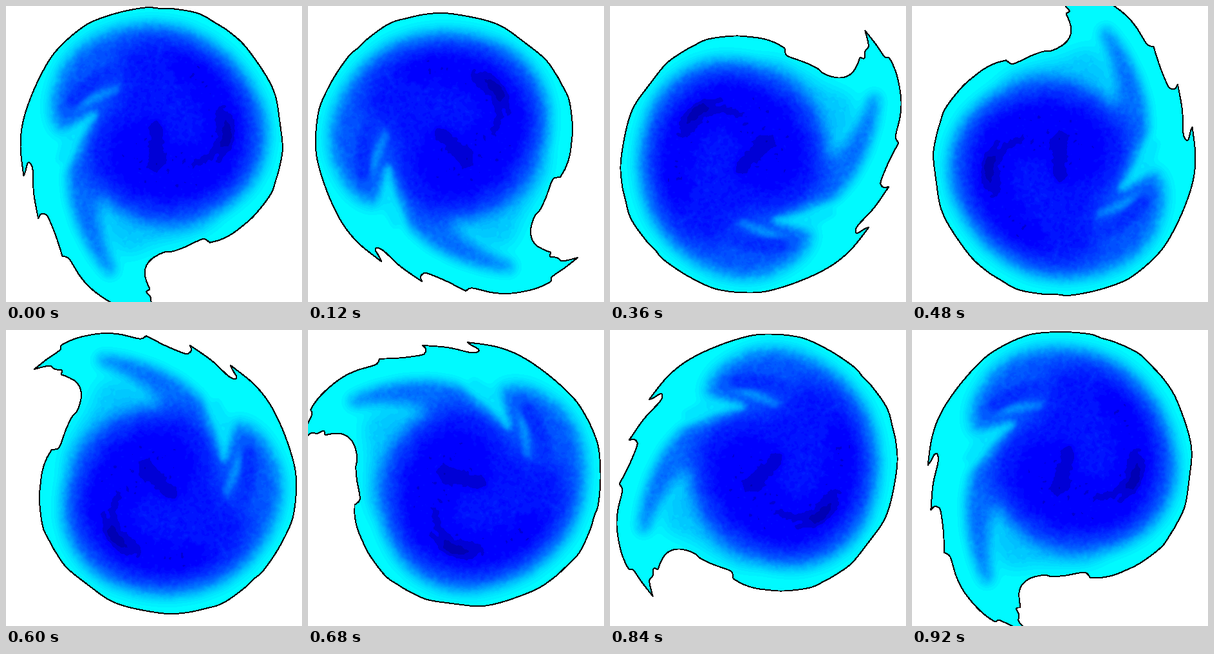
A matplotlib script for the animation above (960 ms loop, 460 by 460 pixels).

```python
import numpy as np
import matplotlib.pyplot as plt
from matplotlib.animation import FuncAnimation
from matplotlib.path import Path

SIZE = 460
DPI = 80
STEPS = 24
INTERVAL = 40
REST_STEP = 21            # step at which the shape stands as drawn below
CENTRE = np.array([231.0, 225.5])

# Rim of the swirl, cut into curves that meet at sharp points
TAIL_INNER = [(66, 413), (62, 398), (61, 388), (66, 381), (67, 371), (70, 370),
              (74, 371), (78, 361), (85, 349), (95, 342), (108, 340), (122, 343),
              (133, 348), (141, 355), (160, 364), (180, 371), (189, 376), (191, 386)]
BODY = [(191, 386), (205, 394), (222, 400), (240, 403), (270, 405), (310, 400),
        (332, 390), (350, 380), (375, 362), (400, 331), (422, 301), (433, 276),
        (441, 242), (446, 205), (444, 175), (439, 152), (430, 121), (408, 89),
        (392, 72), (380, 58), (347, 35), (310, 16), (285, 9), (250, 6),
        (215, 9), (165, 25), (120, 47), (88, 73), (60, 108)]
TOOTH_A = [(60, 108), (67, 105), (77, 99), (81, 101), (76, 112), (52, 138), (29, 171)]
TOOTH_B = [(29, 171), (36, 169), (41, 173), (41, 181), (29, 210), (14, 239)]
TAIL_OUTER = [(14, 239), (18, 245), (18, 253), (12, 278), (10, 300), (12, 322),
              (18, 348), (28, 370), (36, 373), (50, 393), (66, 413)]


def smooth(points, n=6):
    """Catmull-Rom curve through an open list of points."""
    p = np.array(points, float)
    p = np.vstack([p[:1], p, p[-1:]])
    t = (np.arange(n) / n)[:, None]
    parts = []
    for a, b, c, d in zip(p, p[1:], p[2:], p[3:]):
        parts.append(0.5 * (2 * b + (c - a) * t + (2 * a - 5 * b + 4 * c - d) * t**2
                            + (3 * b - a - 3 * c + d) * t**3))
    return np.vstack(parts)


RIM = np.vstack([smooth(s) for s in (TAIL_INNER, BODY, TOOTH_A, TOOTH_B, TAIL_OUTER)])
RIM = np.vstack([RIM, RIM[:1]])

yy, xx = np.mgrid[0:SIZE, 0:SIZE].astype(float)
pixels = np.column_stack([xx.ravel(), yy.ravel()])
freq = np.fft.fftfreq(SIZE)
freq2 = freq[:, None]**2 + freq[None, :]**2


def blur(a, sigma):
    return np.fft.ifft2(np.fft.fft2(a) * np.exp(-2 * np.pi**2 * sigma**2 * freq2)).real


def soft(field, level, sigma, points):
    """Blend a blurred polygon of the given level into the field."""
    mask = Path(points).contains_points(pixels).reshape(SIZE, SIZE).astype(float)
    mask = blur(mask, sigma)
    return field + (level - field) * mask


def make_field():
    """Levels: 255 is cyan, 0 is pure blue, below 0 is darker blue."""
    f = np.full((SIZE, SIZE), 253.0)
    # pale pocket between tail and core
    f = soft(f, 198, 13, [(130, 215), (105, 235), (82, 275), (85, 310), (130, 328),
                          (190, 362), (230, 370), (190, 310)])
    # tail arm
    f = soft(f, 105, 9, [(150, 138), (110, 154), (84, 185), (63, 225), (49, 270),
                         (43, 312), (56, 316), (70, 280), (92, 245), (112, 222),
                         (140, 210)])
    # body halo
    f = soft(f, 82, 12, [(168, 62), (190, 47), (220, 33), (255, 28), (295, 36),
                         (335, 56), (370, 85), (396, 120), (411, 160), (417, 205),
                         (412, 250), (398, 295), (372, 332), (335, 357), (295, 368),
                         (255, 366), (215, 355), (180, 337), (152, 310), (134, 275),
                         (125, 240), (120, 195), (132, 160), (160, 137), (205, 122),
                         (175, 108), (148, 104), (152, 84)])
    # core
    f = soft(f, 18, 14, [(137, 170), (172, 142), (215, 132), (265, 125), (290, 80),
                         (345, 90), (378, 130), (396, 200), (388, 260), (365, 302),
                         (325, 335), (285, 347), (240, 341), (200, 323), (165, 293),
                         (145, 255), (135, 210)])
    f = soft(f, -6, 9, [(165, 190), (205, 165), (250, 168), (272, 190), (260, 235),
                        (285, 262), (320, 250), (336, 200), (340, 140), (368, 140),
                        (384, 200), (375, 260), (345, 305), (290, 333), (235, 323),
                        (190, 290), (163, 240)])
    # streaks in the upper band
    f = soft(f, 42, 6, [(178, 76), (215, 67), (260, 74), (288, 94), (270, 101),
                        (230, 91), (190, 87)])
    f = soft(f, 150, 4, [(186, 93), (225, 94), (264, 114), (258, 118), (222, 107)])
    f = soft(f, 225, 5, [(110, 128), (150, 108), (212, 115), (206, 123), (160, 126),
                         (125, 143)])
    # dark patches
    f = soft(f, -42, 2.5, [(206, 238), (225, 219), (243, 207), (258, 191), (269, 194),
                           (263, 211), (245, 227), (233, 248), (212, 250)])
    f = soft(f, -42, 2.5, [(245, 276), (290, 287), (318, 279), (335, 255), (350, 248),
                           (354, 270), (340, 291), (318, 305), (284, 308), (306, 296),
                           (270, 290)])
    f = soft(f, -80, 3, [(308, 292), (330, 277), (344, 271), (336, 290), (318, 300)])
    # slight mottling
    grain = blur(np.random.default_rng(4).normal(size=f.shape), 1.8)
    return f + 5 * grain / grain.std() * np.clip((235 - f) / 60, 0, 1)


FIELD = make_field()


def turn(p, angle):
    """Rotate counterclockwise on screen (y points down)."""
    c, s = np.cos(angle), np.sin(angle)
    x, y = (p - CENTRE).T
    return np.column_stack([x * c + y * s, y * c - x * s]) + CENTRE


def sample(p):
    x, y = np.clip(p, 0, SIZE - 1.001).T
    i, j = y.astype(int), x.astype(int)
    u, v = y - i, x - j
    top = FIELD[i, j] * (1 - v) + FIELD[i, j + 1] * v
    low = FIELD[i + 1, j] * (1 - v) + FIELD[i + 1, j + 1] * v
    return (top * (1 - u) + low * u).reshape(SIZE, SIZE)


def colour(level):
    level = np.round(level / 10) * 10
    rgb = np.zeros(level.shape + (3,))
    rgb[..., 1] = np.clip(level, 0, 255)
    # darker blues come in flat patches
    rgb[..., 2] = np.select([level < -55, level < -15], [180, 214], 255)
    return rgb.astype(np.uint8)


fig = plt.figure(figsize=(SIZE / DPI, SIZE / DPI), dpi=DPI, facecolor="white")
ax = fig.add_axes([0, 0, 1, 1])
ax.axis("off")
image = ax.imshow(np.full((SIZE, SIZE, 3), 255, np.uint8), interpolation="nearest",
                  aspect="auto", extent=(-0.5, SIZE - 0.5, SIZE - 0.5, -0.5))
rim, = ax.plot([], [], color="black", lw=0.8, antialiased=False)
ax.set_xlim(-0.5, SIZE - 0.5)
ax.set_ylim(SIZE - 0.5, -0.5)


def draw(step):
    angle = np.radians((step - REST_STEP) * 360 / STEPS)
    edge = turn(RIM, angle)
    image.set_data(colour(sample(turn(pixels, -angle))))
    image.set_clip_path(Path(edge), transform=ax.transData)
    rim.set_data(edge[:, 0], edge[:, 1])
    return image, rim


anim = FuncAnimation(fig, draw, frames=STEPS, interval=INTERVAL, repeat=True,
                     repeat_delay=0)
plt.show()
```
